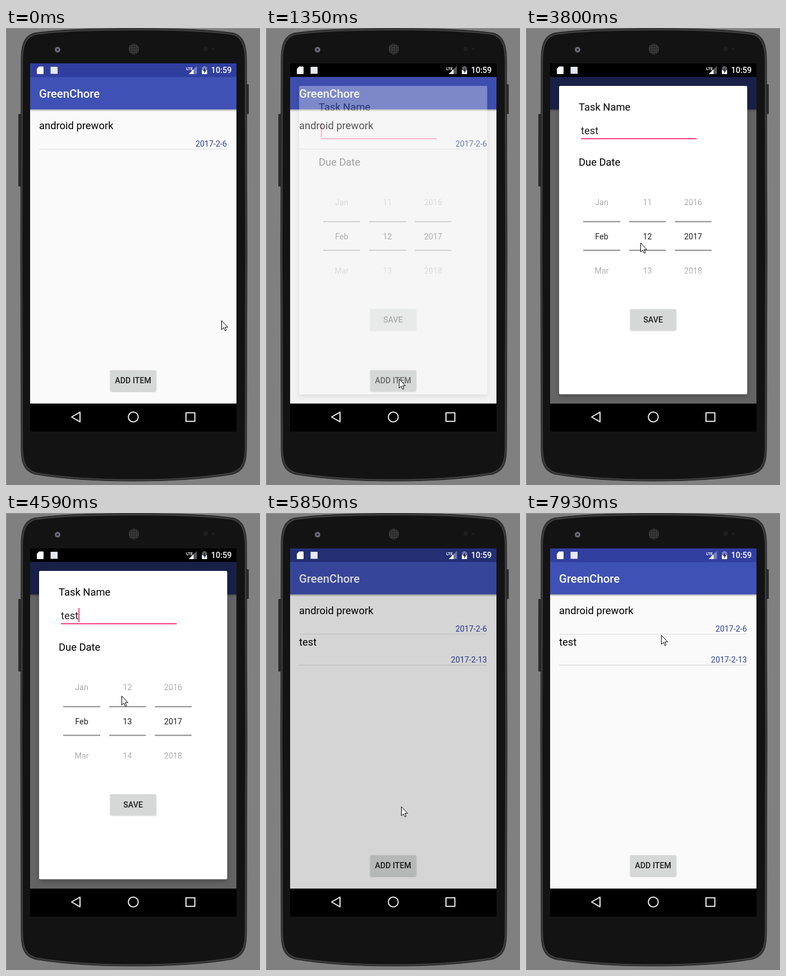
Recreate the animation shown at these times as an HTML page. Size 453 by 813 pixels, loop 8000 ms.

```html
<!DOCTYPE html>
<html lang="en">
<head>
<meta charset="utf-8">
<title>Todo list demo</title>
<style>
  html, body { margin: 0; width: 100%; height: 100%; overflow: hidden; background: #808080; }
  svg { display: block; width: 453px; height: 813px; }
  text { font-family: Roboto, "Liberation Sans", sans-serif; font-size: 14.3px; }
  .body { font-size: 18.4px; }
  .title { font-size: 20.4px; font-weight: 500; }
  .label { font-weight: 500; fill: #1f1f1f; text-anchor: middle; }
  .date { fill: #303f9f; text-anchor: end; }
  .mid { text-anchor: middle; fill: #222; }
  .pink { stroke: #ff4081; stroke-width: 2; }
  .clock { font-size: 14.5px; font-weight: 500; text-anchor: end; }
  .lte { font-size: 7px; font-weight: 700; }
</style>
</head>
<body>
<svg viewBox="0 0 453 813" xmlns="http://www.w3.org/2000/svg">
  <defs>
    <path id="shell" d="M27 52C28 26 34 14 50 9C100 2 160 .8 228 .8S356 2 406 9C421 13 428 26 429 52L430 400L429 745C429 775 424 788 404 794C350 803 290 806 228 806S106 803 52 794C32 788 27 775 27 745L26 400Z"/>
    <pattern id="mesh" width="3" height="3" patternUnits="userSpaceOnUse">
      <rect width="3" height="3" fill="#151515"/>
      <circle cx="1.5" cy="1.5" r="1" fill="#6c6c6c"/>
    </pattern>
    <linearGradient id="drop" x2="0" y2="1">
      <stop offset="0" stop-opacity=".3"/>
      <stop offset="1" stop-opacity="0"/>
    </linearGradient>
    <linearGradient id="edges" gradientUnits="userSpaceOnUse" x1="0" y1="278" x2="0" y2="462">
      <stop offset="0" stop-color="#000"/>
      <stop offset=".46" stop-color="#fff"/>
      <stop offset=".54" stop-color="#fff"/>
      <stop offset="1" stop-color="#000"/>
    </linearGradient>
    <mask id="fade" maskUnits="userSpaceOnUse" x="94" y="278" width="250" height="184">
      <rect x="94" y="278" width="250" height="184" fill="url(#edges)"/>
    </mask>
    <!-- keeps the dialog shadow from showing through the dialog -->
    <clipPath id="outside">
      <path clip-rule="evenodd" d="M43 87H411V668H43ZM59 103V651.500H394.500V103Z"/>
    </clipPath>
    <filter id="soft" x="-10%" y="-10%" width="120%" height="130%">
      <feDropShadow dx="0" dy="1" stdDeviation=".8" flood-opacity=".3"/>
    </filter>
    <filter id="blur"><feGaussianBlur stdDeviation="5"/></filter>
  </defs>

  <!-- phone -->
  <path d="M0 .5H453M.5 0V813" stroke="#969696"/>
  <rect x="22" y="153" width="5" height="129" rx="1" fill="#2b2b2b"/>
  <rect x="428" y="100" width="5" height="53" rx="1" fill="#2b2b2b"/>
  <use href="#shell" fill="#303030" stroke="#262626"/>
  <use href="#shell" fill="#131313" stroke="#404040" stroke-width="2" transform="translate(228 403.5) scale(.989 .994) translate(-228 -403.5)"/>
  <circle cx="92" cy="38.500" r="5.200" fill="#55555a"/>
  <circle cx="92" cy="38.500" r="3.800" fill="#7f7c94"/>
  <circle cx="92" cy="38.500" r="2.300" fill="#2b2740"/>
  <circle cx="228" cy="37.500" r="9.500" fill="url(#mesh)"/>
  <circle cx="356" cy="37" r="4" fill="#1e1e1e"/>
  <circle cx="369.500" cy="37" r="2.500" fill="#1e1e1e"/>

  <!-- list screen -->
  <rect x="43" y="63" width="368" height="605.300" fill="#fafafa"/>
  <rect x="43" y="63" width="368" height="25" fill="#303f9f"/>
  <rect x="43" y="87.300" width="368" height="57.500" fill="#3f51b5"/>
  <rect x="43" y="144.800" width="368" height="4" fill="url(#drop)"/>
  <text class="title" x="59" y="124" fill="#fff">GreenChore</text>
  <text class="body" x="59" y="180">android prework</text>
  <text class="date" x="394" y="210.500">2017-2-6</text>
  <path d="M59 215.500H394" stroke="#dcdcdc"/>
  <g id="added">
    <text class="body" x="59" y="236">test</text>
    <text class="date" x="394" y="266">2017-2-13</text>
    <path d="M59 270.500H394" stroke="#d4d4d4"/>
  </g>
  <rect id="addBtn" x="185.900" y="608.700" width="81.800" height="37" rx="2" filter="url(#soft)"/>
  <text class="label" x="226.700" y="632">ADD ITEM</text>
  <rect id="dim" x="43" y="63" width="368" height="605.300"/>
  <rect id="bar" x="43" y="63" width="368" height="24"/>

  <!-- status icons -->
  <g fill="#fff">
    <path d="M59 68.500H66Q67 68.500 67 69.500V81Q67 82 66 82H56Q55 82 55 81V72.500Z"/>
    <rect x="79.500" y="69" width="12.500" height="12.500" fill="#e6e8f4"/>
    <text class="lte" x="321.500" y="74.500">LTE</text>
    <path d="M326 82L340.500 67.500V82Z" fill-opacity=".35"/>
    <path d="M326 82L334.500 73.500V82Z"/>
    <path d="M352 68H356V69.500H358.500V82H349.500V69.500H352Z" fill-opacity=".38"/>
    <path d="M349.500 75H358.500V82H349.500Z"/>
    <path d="M355 70.500L351.200 76.500H353.600V81L357 75H355Z" fill="#20264d"/>
    <text class="clock" x="402.500" y="80.300">10:59</text>
  </g>

  <!-- dialog -->
  <g id="dialog">
    <g clip-path="url(#outside)">
      <rect x="59" y="107" width="335.500" height="548.500" fill-opacity=".25" filter="url(#blur)"/>
    </g>
    <rect x="59" y="103" width="335.500" height="548.500" rx="2" fill="#fff"/>
    <text class="body" x="94" y="147">Task Name</text>
    <text class="body" id="typed" x="98" y="188.500" fill="#222"></text>
    <path class="pink" d="M98 197H304.500"/>
    <path class="pink" id="caret" d="M98.800 169V194"/>
    <text class="body" x="94" y="245">Due Date</text>
    <g id="picker" mask="url(#fade)"></g>
    <path d="M102 344.500h66m16 0h65.500m16 0h65.500M102 395.500h66m16 0h65.500m16 0h65.500" stroke="#898989" stroke-width="2"/>
    <rect x="185.900" y="500.200" width="81.800" height="37" rx="2" fill="#d6d7d7" filter="url(#soft)"/>
    <text class="label" x="226.700" y="523.700">SAVE</text>
  </g>

  <!-- navigation -->
  <rect x="43" y="668.300" width="368" height="49.700"/>
  <g fill="none" stroke="#eee" stroke-width="2" stroke-linejoin="round">
    <path d="M117 692L132 683.300V700.700Z"/>
    <circle cx="227" cy="692" r="8.800"/>
    <rect x="321" y="684.500" width="15.800" height="15.300"/>
  </g>
  <path id="pointer" d="M.5 .5V16.500L4.200 13.200L6.700 18.700L9 17.600L6.600 12.300H11.500Z" fill="#fff" stroke="#000"/>
</svg>
<script>
const LOOP = 8000, ROW = 61, BLINK = 500;
const OPEN = 1350, CLOSE = 5850, CLEAR = 5970;
const WORD = "test", keyTimes = [2700, 2850, 3120, 3240];
const focusTime = 1180;
const $ = id => document.getElementById(id);
const clock0 = performance.now();

const home = { x: 384, y: 520 };
const moves = [
  { from: 150, to: 960, steps: 7, x: 237, y: 624 },
  { from: 1700, to: 1900, steps: 2, x: 236, y: 579 },
  { from: 3520, to: 3800, steps: 3, x: 204, y: 382 },
  { from: 4080, to: 4330, steps: 3, x: 206, y: 325 },
  { from: 4600, to: 5300, steps: 6, x: 241, y: 522 },
  { from: 7090, to: 7930, steps: 7, x: 241, y: 217, bow: 11 }
];

// 0 to 1 in equal jumps, the first at "from" and the last at "to"
function stepped(t, from, to, steps) {
  if (t < from) return 0;
  return Math.min(steps, 1 + Math.floor((t - from) / (to - from) * (steps - 1))) / steps;
}
const smooth = p => p * p * (3 - 2 * p);
const within = (t, a, b) => t >= a && t < b;

function pointerAt(t) {
  let { x, y } = home;
  for (const m of moves) {
    const p = smooth(stepped(t, m.from, m.to, m.steps));
    x += (m.x - x) * p + (m.bow || 0) * Math.sin(Math.PI * p);
    y += (m.y - y) * p;
  }
  return [Math.round(x), Math.round(y)];
}

function column(x, labels) {
  const g = document.createElementNS("http://www.w3.org/2000/svg", "g");
  g.innerHTML = labels.map((s, i) =>
    `<text class="mid" x="${x}" y="${314.5 + i * ROW}">${s}</text>`).join("");
  $("picker").append(g);
  return g;
}
column(135, ["Jan", "Feb", "Mar"]);
const days = column(216.5, [11, 12, 13, 14]);
column(298, [2016, 2017, 2018]);

function drawField(t) {
  const pressed = keyTimes.filter(k => k <= t);
  const lastEdit = pressed.at(-1) ?? focusTime;
  $("typed").textContent = WORD.slice(0, pressed.length);
  const width = pressed.length ? $("typed").getComputedTextLength() : 0;
  $("caret").setAttribute("transform", `translate(${width} 0)`);
  $("caret").style.opacity = Math.floor((t - lastEdit) / BLINK) % 2 ? 0 : 1;
}

function draw(t) {
  const open = t < CLOSE ? stepped(t, OPEN, 1500, 2) : 0;
  const closing = within(t, CLOSE, CLEAR) ? .15 : 0;
  $("dialog").style.opacity = open ** 1.6;
  $("dim").style.opacity = .6 * open ** 4.3 + closing;
  $("bar").style.opacity = open ? 1 : closing;
  $("addBtn").setAttribute("fill", within(t, 1230, 1500) ? "#c9caca" : "#d6d7d7");
  $("added").style.opacity = t >= CLOSE ? 1 : 0;
  $("pointer").setAttribute("transform", `translate(${pointerAt(t)})`);
  const scroll = smooth(stepped(t, 4080, 4460, 4));
  days.setAttribute("transform", `translate(0 ${-ROW * scroll})`);
  drawField(t);
}

function tick() {
  draw((performance.now() - clock0) % LOOP);
  requestAnimationFrame(tick);
}
tick();
</script>
</body>
</html>
```
